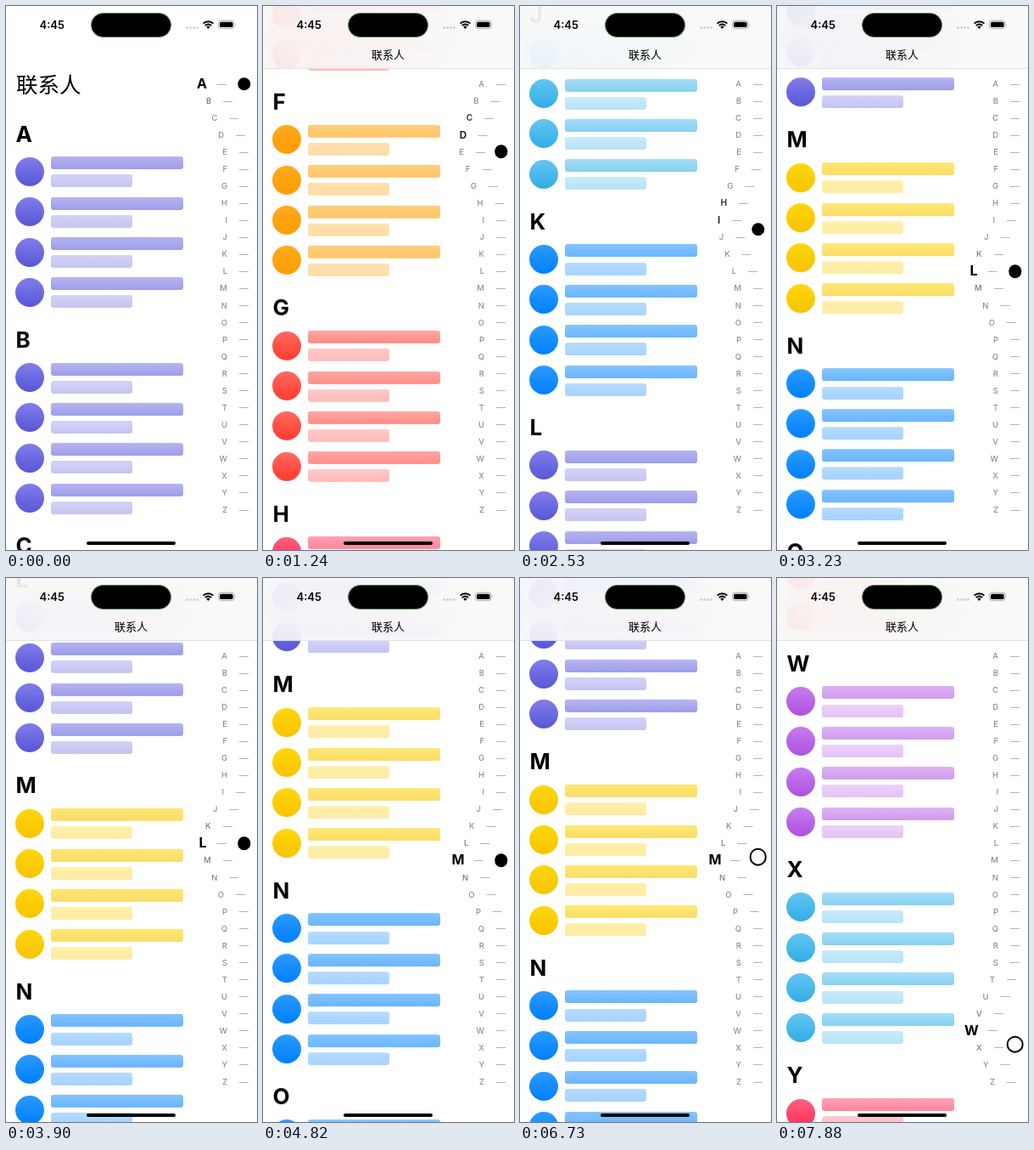
An HTML page that plays this animation: 296 px wide and 640 px high, repeating every 7.99 s.

```html
<!DOCTYPE html>
<html lang="zh-CN">
<head>
<meta charset="utf-8">
<style>
html, body { margin: 0; width: 100%; height: 100%; overflow: hidden; background: #fff; }
#stage { position: relative; width: 296px; height: 640px; overflow: hidden; color: #000; font-family: Inter, sans-serif; }
#stage div, #stage span, svg { position: absolute; }
#list { left: 0; top: 0; width: 212px; will-change: transform; }
h2, h1, h3 { position: absolute; margin: 0; white-space: nowrap; }
h1, h3 { font-family: "Noto Sans CJK SC", "Noto Sans CJK JP", sans-serif; font-weight: 500; }
h1 { left: 12px; top: 70.5px; font-size: 25.5px; line-height: 40px; }
h2 { left: 11.5px; top: -20px; font-size: 26px; line-height: 40px; font-weight: 700; }
h3 { left: 0; width: 295px; top: 46.5px; font-size: 13px; line-height: 20px; text-align: center; }
.dot, .bar { background: linear-gradient(var(--light), var(--deep)); }
.dot { left: 11px; width: 34px; height: 34px; border-radius: 50%; }
.bar { left: 52.5px; height: 15px; border-radius: 3px; }
#head { left: 0; top: 0; width: 296px; height: 73px; background: rgba(249,249,249,.87); backdrop-filter: blur(24px); border-bottom: 1px solid #e2e2e2; }
.letter { right: 35px; line-height: 14px; font-size: 9.5px; }
.tick { left: 275px; width: 11px; height: 1px; background: #b4b4b6; }
#touch { left: 280.5px; border-radius: 50%; box-sizing: border-box; transform: translate(-50%, -50%); }
#clock { left: 39.5px; top: 12px; font-size: 13px; line-height: 20px; font-weight: 600; }
#island { left: 100px; top: 8px; width: 95px; height: 28.5px; border-radius: 15px; background: #000; box-sizing: border-box; border: 1px solid #4f7a50; }
#home { left: 95px; top: 630px; width: 105px; height: 4px; border-radius: 2px; background: #000; }
</style>
</head>
<body>
<div id="stage">
  <div id="list"><h1>联系人</h1></div>
  <div id="head"><h3>联系人</h3></div>
  <span id="clock">4:45</span>
  <div id="island"></div>
  <svg width="296" height="40" style="left:0;top:0">
    <path d="M213.5 25.5h14" stroke="#c4c4c6" stroke-width="2.6" stroke-linecap="round" stroke-dasharray="0 4"/>
    <path d="M232.6 20.6a8.4 8.4 0 0 1 11.8 0M234.8 23.1a5.2 5.2 0 0 1 7.4 0" fill="none" stroke="#000" stroke-width="1.9"/>
    <path d="M238.5 27l-2.2-2.4a3.2 3.2 0 0 1 4.4 0z"/>
    <rect x="250.5" y="17.2" width="18.6" height="9.4" rx="3" fill="none" stroke="#a8a8a8"/>
    <rect x="252" y="18.7" width="15.6" height="6.4" rx="1.7"/>
    <path d="M270.3 20.3q1.2 1.6 0 3.2z" fill="#a8a8a8"/>
  </svg>
  <div id="home"></div>
</div>
<script>
const LOOP = 7990, PITCH = 242.33, STEP = 20.04, TOP = 92;
const letters = [...'ABCDEFGHIJKLMNOPQRSTUVWXYZ'];
const palette = {
  i: ['#807eea', '#5856d6'], b: ['#2b9aff', '#0080ff'], y: ['#ffd60a', '#f7c400'], r: ['#ff6a60', '#ff3b30'],
  o: ['#ffaa1f', '#ff9d00'], p: ['#ff6080', '#ff2d55'], u: ['#c57cf0', '#af52de'], c: ['#62c6f2', '#32ade6']
};
const tones = 'iibyrorpucbiybbpcroiyrucpb';

// Start, end, row reached, offset of the touch from that row
const drags = [[790, 1650, 7, 0], [1650, 1730, 6, 4], [2100, 3060, 11, 0], [4130, 4600, 12, 0], [6700, 6730, 12, -4], [6850, 7600, 22, 16]];
// Start, end, scroll offset reached
const scrolls = [[690, 1600, 2063], [1600, 2100, 1880], [2100, 3100, 2901], [3230, 4010, 2800], [4130, 4820, 2933], [4820, 5610, 2842], [6780, 7800, 5381]];

const clamp = x => Math.min(1, Math.max(0, x));
const glide = (moves, t, col = 2) =>
  moves.reduce((v, m) => v + (m[col] - v) * clamp((t - m[0]) / (m[1] - m[0])), 0);

function add(parent, tag, cls, css, text = '') {
  const el = document.createElement(tag);
  el.className = cls;
  el.style.cssText = css;
  el.textContent = text;
  parent.append(el);
  return el;
}

const $ = id => document.getElementById(id);
const stage = $('stage'), list = $('list'), head = $('head');

const marks = letters.map((ch, i) => {
  const [light, deep] = palette[tones[i]];
  const section = add(list, 'div', '', `left:0;top:${150.5 + PITCH * i}px;--light:${light};--deep:${deep}`);
  add(section, 'h2', '', '', ch);
  for (let r = 0; r < 4; r++) {
    const y = 44.3 + 47.35 * r;
    add(section, 'div', 'dot', `top:${y - 17}px`);
    add(section, 'div', 'bar', `top:${y - 17.6}px;width:156.5px;opacity:.58`);
    add(section, 'div', 'bar', `top:${y + 3.5}px;width:96.5px;opacity:.35`);
  }
  const y = TOP + STEP * i;
  return {
    letter: add(stage, 'span', 'letter', `top:${y - 7}px`, ch),
    tick: add(stage, 'div', 'tick', `top:${y - .5}px`)
  };
});
const touch = add(stage, 'div', '', '');
touch.id = 'touch';

function draw(t) {
  const scroll = glide(scrolls, t);
  list.style.transform = `translateY(${-scroll}px)`;
  head.style.visibility = scroll > 40 ? 'visible' : 'hidden';

  // The emphasis trails the wave, which trails the touch
  const wave = glide(drags, t), late = glide(drags, t - 130);
  marks.forEach(({ letter, tick }, i) => {
    const shift = Math.max(0, 26.5 - 7.5 * Math.abs(wave - i));
    const focus = clamp(1.15 - Math.abs(late - i));
    const grey = 142 * (1 - focus);
    letter.style.transform = `translateX(${-shift}px) scale(${1 + .7 * focus ** 4})`;
    letter.style.color = `rgb(${grey},${grey},${grey})`;
    letter.style.fontWeight = focus > .25 ? 700 : 500;
    tick.style.transform = `translateX(${-shift}px)`;
  });

  const lifted = (t >= 6730 && t < 6890) || t >= 7700;
  const size = lifted ? 20.6 : 15.4;
  const y = TOP + STEP * glide(drags, t + 35) + glide(drags, t, 3);
  touch.style.cssText = `top:${y}px;width:${size}px;height:${size}px;` +
    (lifted ? 'border:2px solid #000' : 'background:#000');
}

const start = performance.now();
function frame() {
  draw((performance.now() - start) % LOOP);
  requestAnimationFrame(frame);
}
frame();
</script>
</body>
</html>
```
